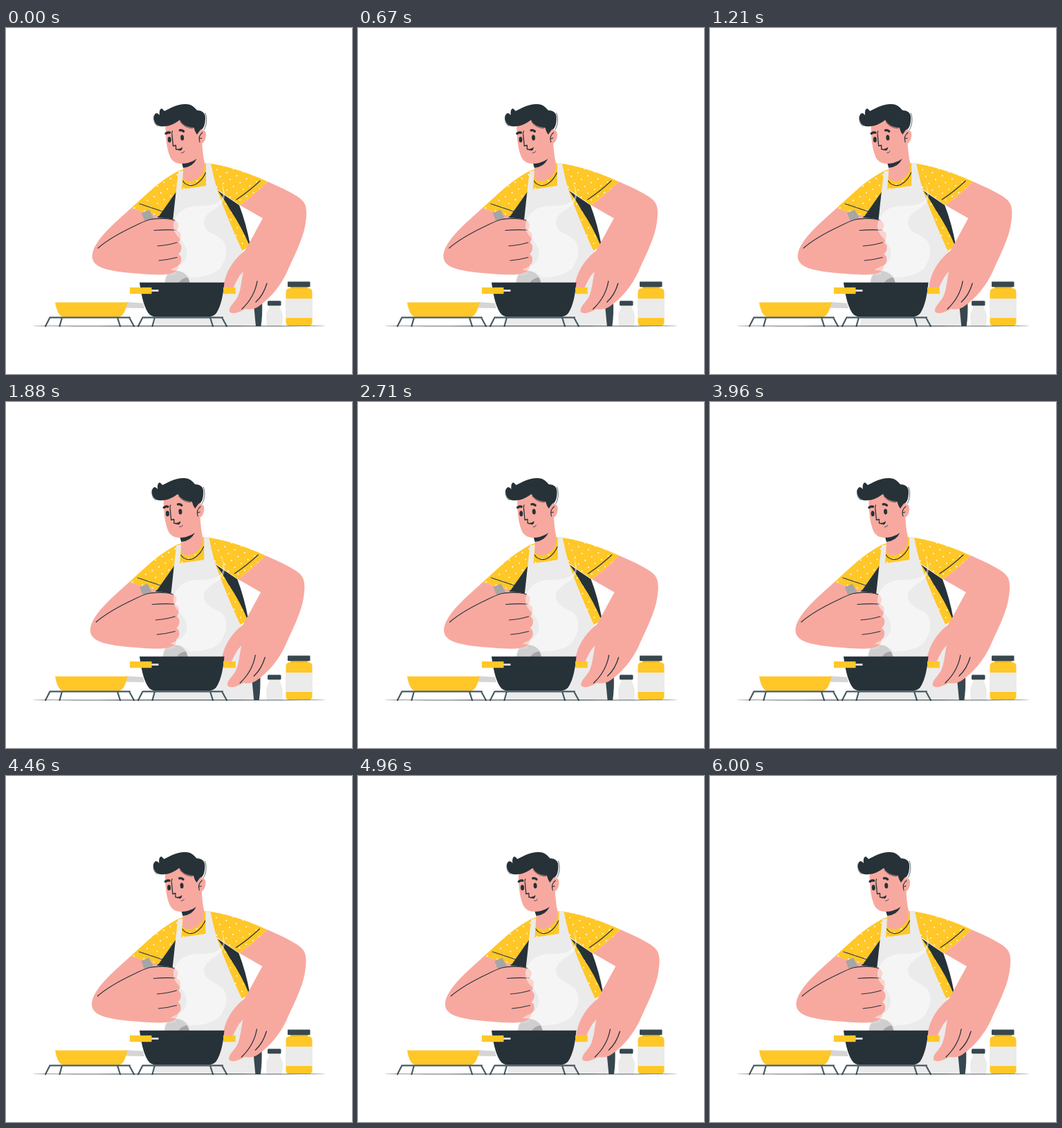
An HTML page with a canvas that plays this animation: 500x500 px, repeating every 6040 ms.

```html
<!DOCTYPE html>
<html lang="en">
<head>
<meta charset="utf-8">
<title>Cooking</title>
<style>
html, body { margin: 0; width: 100%; height: 100%; overflow: hidden; background: #fff; }
canvas { display: block; width: 500px; height: 500px; }
</style>
</head>
<body>
<canvas id="stage"></canvas>
<script>
const LOOP = 6040;
const SWAYS = 5;
const REACH = 3.8;
const LEAD = 0.14;

const DARK = '#263238';
const YELLOW = '#ffc727';
const SKIN = '#f7a9a0';
const APRON = '#ebebeb';
const SLATE = '#37474f';
const STEEL = '#455a64';

const canvas = document.getElementById('stage');
const ctx = canvas.getContext('2d');
const ratio = window.devicePixelRatio || 1;
canvas.width = canvas.height = 500 * ratio;

function fill(d, color) {
  ctx.fillStyle = color;
  ctx.fill(new Path2D(d));
}

function line(d, width = 1.2, color = DARK) {
  ctx.strokeStyle = color;
  ctx.lineWidth = width;
  ctx.lineCap = ctx.lineJoin = 'round';
  ctx.stroke(new Path2D(d));
}

function box(x, y, w, h, color, r = 0) {
  ctx.fillStyle = color;
  ctx.beginPath();
  ctx.roundRect(x, y, w, h, r);
  ctx.fill();
}

function oval(x, y, rx, ry, color, turn = 0) {
  ctx.fillStyle = color;
  ctx.beginPath();
  ctx.ellipse(x, y, rx, ry, turn, 0, Math.PI * 2);
  ctx.fill();
}

// Yellow cloth with a staggered lattice of white dots
function cloth(d, angle) {
  fill(d, YELLOW);
  ctx.save();
  ctx.clip(new Path2D(d));
  ctx.translate(300, 220);
  ctx.rotate(angle);
  for (let row = -14; row <= 14; row++) {
    for (let col = -11; col <= 11; col++) {
      oval(col * 15 + (row & 1) * 7.5, row * 8, 1, 1, '#fff');
    }
  }
  ctx.restore();
}

function drawTorso() {
  fill('M354 397L370 394Q371 413 368.5 431H359Z', SLATE);
  fill('M247 233L217 273L246 285Z', DARK);
  fill('M303 233L337 256Q347 282 353 314L344 319Z', DARK);
  cloth('M250 206Q231 216 212 232L181 260Q199 267 221 272L247 235L289 229L305 233L338 256Q352 247 378 222Q330 200 289 195Z', 0.3);
  cloth('M302 230Q315 246 324 263Q341 288 352 315L340 323L318 285Z', 0.9);
  line('M193 254L226 265');
  line('M333 248Q351 236 367 221');

  fill('M256 182L283 160Q284 183 287 195L286 207Q278 220 267 221.5Q260 221 256 218Z', SKIN);
  line('M255.5 221C260 228 268 229 274 226Q284 220 288.5 209', 1.2);
  fill('M254 195Q266 196 275.5 189Q270 201 256 202Z', DARK);

  fill('M249 207L256 206L254 233L289 228V195H296Q300 216 305 233Q317 268 340 319L352 336L361 431H214L233 350L242 270L246 233Z', APRON);
}

function drawHead() {
  fill('M230 135L231 156Q232 174 237 186C242 197 253 197 263 195Q277 190 280 177L284 164V136L255 124Z', SKIN);
  fill('M277 152C282 145 290 146 289 156C288 165 283 169 277 167Z', SKIN);
  line('M284 151Q277 156 280 165M280 160L283 159', 1.1);
  fill('M217 139C213 134 212 126 217 123Q220 123 222 126C221 120 223 115 226 117L229 120C239 115 248 109.5 260 110C268 110 273 115 276 119C284 119 288 123 288 130C288 139 286 146 281 147L276 154Q273 150 271.5 144C262 144 255 140 251 133Q239 142 229 142Q221 143 217 139Z', DARK);
  line('M288 123C291 130 290 141 286 147M214 127Q212 137 219 142M252 136Q259 145 270 145', 0.7);

  line('M231 152.5Q233.5 150.3 236.5 151.2', 3.4);
  line('M251.3 147.8Q254 147 256.5 149.3', 3.4);
  oval(236.2, 161.3, 2.5, 4, DARK, -0.05);
  oval(254.7, 158.5, 2.5, 4, DARK, -0.05);
  line('M240.5 149Q239.3 151 240 155L241.5 170.5L245.5 169.5V175L249.5 176', 1.3);
  fill('M248 175Q252 175 255 172Q255 176 252 177.5Z', DARK);
  line('M253.5 180.5Q257 181 258 178', 0.8);
}

function drawLadle() {
  const bowl = 'M230 372C229 359 235 351 247 351C258 351 265 360 266 372Z';
  fill(bowl, '#cfcfcf');
  ctx.save();
  ctx.clip(new Path2D(bowl));
  fill('M248 373Q250 361 266 360V373Z', '#a6a6a6');
  ctx.restore();
  fill('M236 338L243 336L246 356L235 358Z', '#d7d7d7');
}

function drawArms() {
  fill('M181 260C157 282 125 308 124.5 330C125 345 144 349.5 166 352.5C188 355 210 356.5 224 356.5C237 356.5 250 353 249 343Q254 340 253 332Q252 328 249 327Q255 321 253 314L250 310Q254 302 252 296L247 292Q252 284 246 279Q239 275 218 274L221 271.5Q199 267 181 260Z', SKIN);
  fill('M196 267.5L207 262.5L213.5 275L200 278Z', '#a6a6a6');
  line('M133 318C149 304 169 294 186 286C204 277 210 274.5 228 275.5Q238 276 244 278', 1.2);
  line('M214 292.5Q230 291 246 292M219 315Q234 314 247 310M221 336Q234 335 247 331.5');

  fill('M378 222C394 229 417 239 427 248C435.5 255 435 268 433 281C430 305 414 334 406 353C397 372 382 391 364 403C357 407 352 407 346 406C338 410 328 415 323 410C321 403 331 396 335 388C340 376 340 365 343 352C335 359 330 373 326 381H314C314 357 327 336 345 322C354 307 363 289 371 275L338 256Q352 247 378 222Z', SKIN);
  line('M363 366Q359 389 341 406M377 369Q372 386 361 396', 1.3);
}

function drawCook(shift) {
  ctx.save();
  ctx.translate(shift, 0);
  drawTorso();
  drawHead();
  drawLadle();
  drawArms();
  ctx.restore();
}

function drawSteam() {
  fill('M311 222C317 237 319 247 309 256C298 265 285 270 286 283C288 297 305 297 314 308C322 320 318 335 310 346C298 360 280 359 266 361C258 352 248 350 238 350C242 344 263 345 261 322C259 306 241 301 242 285C244 270 256 258 274 257C291 257 308 257 313 244Q315 236 311 222Z', 'rgba(255,255,255,0.5)');
}

function drawStand(x, w) {
  line(`M${x} 418.3H${x + w}M${x} 418.3L${x - 6.5} 431M${x + 17.5} 418.3L${x + 14} 431M${x + w - 18} 418.3L${x + w - 14} 431M${x + w - 1} 418.3L${x + w + 6} 431`, 2.2, STEEL);
}

function drawKitchen() {
  fill('M173 396L198 397.5L200 405L172 404.5Z', '#d5d5d5');
  fill('M71 396.5H175.5C173 407 170 417.5 162 417.5H84C76 417.5 73 407 71 396.5Z', YELLOW);
  drawStand(63.5, 115.5);

  fill('M193 367.8H315.5C314 384 311 402 304 412Q300 417.3 292 417.3H217Q209 417.3 205 411C198 400 195 382 193 367.8Z', DARK);
  box(207, 378, 13.5, 3, '#d5d5d5');
  box(179, 374.9, 31.5, 9.3, YELLOW);
  box(314, 374.9, 17.8, 9.3, YELLOW);
  drawStand(197.5, 115.5);

  fill('M380 401H396C395 407 400 409 400 417L399 431H377L376 417C376 409 381 407 380 401Z', APRON);
  box(378, 394.3, 19.5, 7, SLATE, 1.5);

  box(411, 373, 25, 7, '#efb71e');
  box(404.5, 376.3, 38, 54.5, YELLOW, 5);
  box(404, 391, 39, 28, APRON);
  box(407, 366.5, 32.5, 7.7, SLATE, 1);
}

// Sideways sway that swells and fades over the loop
function swayAt(t) {
  const u = t / LOOP;
  return REACH * Math.sin(Math.PI * u) * Math.cos(2 * Math.PI * SWAYS * u + LEAD);
}

function draw(now) {
  ctx.setTransform(ratio, 0, 0, ratio, 0, 0);
  ctx.fillStyle = '#fff';
  ctx.fillRect(0, 0, 500, 500);
  drawCook(swayAt(now % LOOP));
  drawSteam();
  drawKitchen();
  oval(250, 430.8, 212, 0.5, DARK);
}

const start = performance.now();
function tick() {
  draw(performance.now() - start);
  requestAnimationFrame(tick);
}
tick();
</script>
</body>
</html>
```
